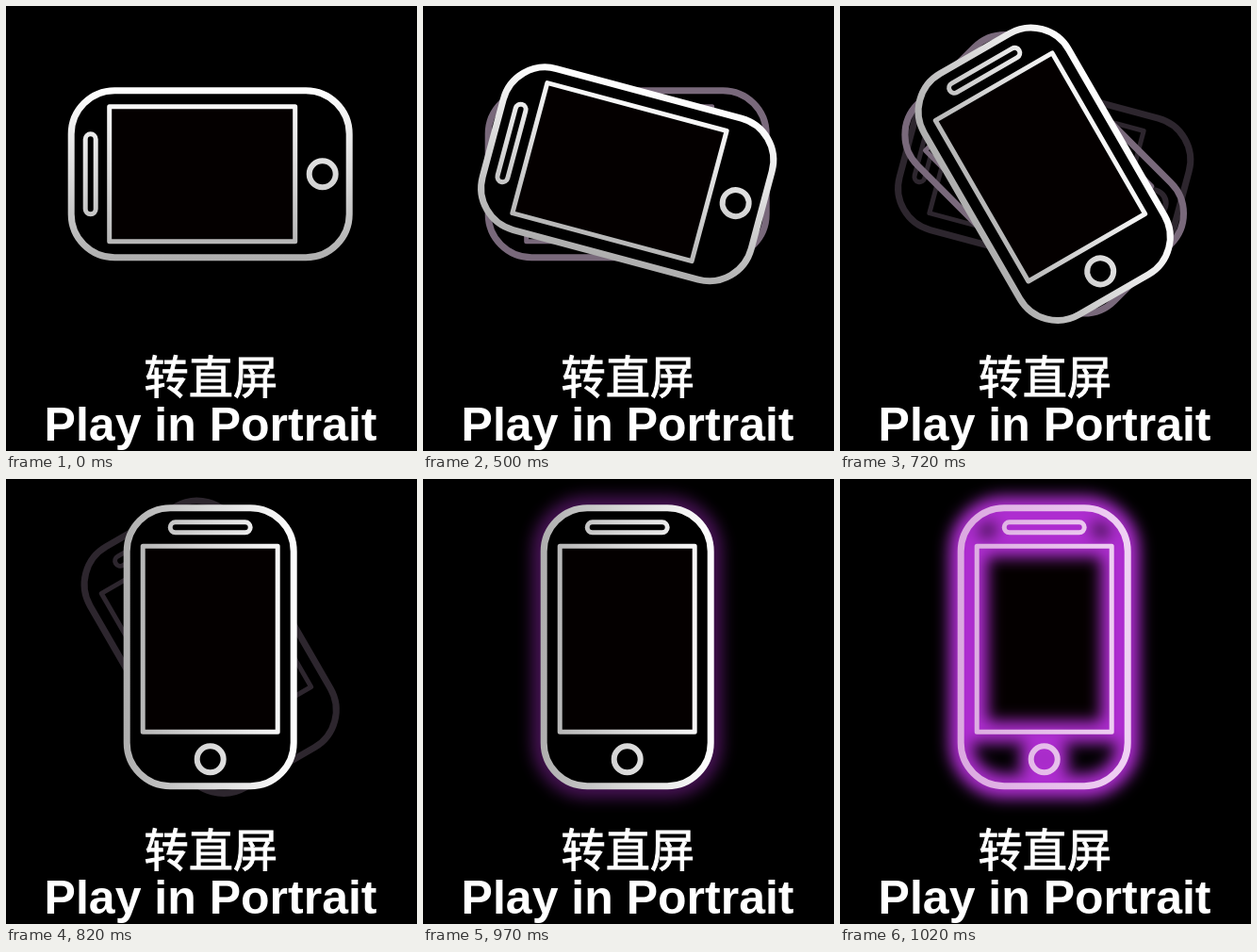
Animation, 436 px wide and 472 px high, one loop 2.02 s. Source, as an HTML page:

```html
<!DOCTYPE html>
<html lang="zh-CN">
<head>
<meta charset="utf-8">
<title>Play in Portrait</title>
<style>
  html, body { margin: 0; width: 100%; height: 100%; overflow: hidden; background: #000; }
  svg { display: block; }
  .case { fill: var(--case, none); stroke-width: calc(7px + var(--spread, 0px)); }
  .screen { fill: var(--screen, none); stroke-width: calc(5px + var(--spread, 0px)); }
  .speaker { fill: none; stroke-width: calc(5px + var(--spread, 0px)); }
  .button { fill: none; stroke-width: calc(6px + var(--spread, 0px)); }
  #phone { --case: #000; --screen: #040000; stroke: url(#metal); }
  #phone.lit { --case: none; --screen: none; stroke: url(#neon); }
  #halo { --spread: 18px; --screen: #040000; stroke: #ae2dd0; filter: url(#blur); }
  #recent { stroke: #79697b; }
  #faded { stroke: #2d262e; }
  text { fill: #fff; font-kerning: none; }
</style>
</head>
<body>
<svg width="436" height="472" viewBox="0 0 436 472">
  <defs>
    <linearGradient id="metal" gradientUnits="userSpaceOnUse" x1="0" y1="-92" x2="0" y2="92">
      <stop offset="0" stop-color="#fff"/>
      <stop offset=".5" stop-color="#dadada"/>
      <stop offset="1" stop-color="#aeaeae"/>
    </linearGradient>
    <linearGradient id="neon" gradientUnits="userSpaceOnUse" x1="0" y1="-92" x2="0" y2="92">
      <stop offset="0" stop-color="#f0d2f4"/>
      <stop offset="1" stop-color="#dba8e0"/>
    </linearGradient>
    <filter id="blur" filterUnits="userSpaceOnUse" x="-200" y="-150" width="400" height="300" color-interpolation-filters="sRGB">
      <feGaussianBlur stdDeviation="8"/>
    </filter>
    <g id="shape" stroke-linejoin="round">
      <rect class="case" x="-147.5" y="-88.5" width="295" height="177" rx="46"/>
      <rect class="screen" x="-107" y="-71.5" width="197" height="143"/>
      <rect class="speaker" x="-132.5" y="-42.5" width="11" height="85" rx="5.5"/>
      <circle class="button" cx="119" cy="0" r="14"/>
    </g>
  </defs>
  <g transform="translate(216.7 178.3)">
    <use id="faded" href="#shape"/>
    <use id="recent" href="#shape"/>
    <use id="halo" href="#shape"/>
    <use id="phone" href="#shape"/>
  </g>
  <text x="146.6" y="411" font-size="47.2" stroke="#fff" font-family="'Noto Sans CJK SC', 'Noto Sans CJK', sans-serif">转直屏</text>
  <text x="40.6" y="461" font-size="50" font-weight="700" font-family="'Liberation Sans', Arial, sans-serif">Play in Portrait</text>
</svg>
<script>
  const LOOP = 2020;
  // Held poses: angles in degrees for the phone and its trails, plus glow strength
  const poses = [
    { at: 0, phone: 0 },
    { at: 500, phone: 15, recent: 0 },
    { at: 620, phone: 45, recent: 15, faded: 0 },
    { at: 720, phone: 60, recent: 45, faded: 15 },
    { at: 820, phone: 90, faded: 60 },
    { at: 920, phone: 90 },
    { at: 970, phone: 90, glow: 0.4 },
    { at: 1020, phone: 90, glow: 1 },
  ];
  const [phone, recent, faded, halo] =
    ['phone', 'recent', 'faded', 'halo'].map(id => document.getElementById(id));

  function place(el, angle) {
    el.style.display = angle === undefined ? 'none' : '';
    el.setAttribute('transform', `rotate(${angle ?? 0})`);
  }

  function draw(time) {
    const pose = poses.findLast(p => p.at <= time);
    const glow = pose.glow ?? 0;
    place(phone, pose.phone);
    place(recent, pose.recent);
    place(faded, pose.faded);
    place(halo, glow ? pose.phone : undefined);
    halo.style.opacity = glow;
    phone.classList.toggle('lit', glow === 1);
  }

  const start = performance.now();
  function tick() {
    draw((performance.now() - start) % LOOP);
    requestAnimationFrame(tick);
  }
  tick();
</script>
</body>
</html>
```
